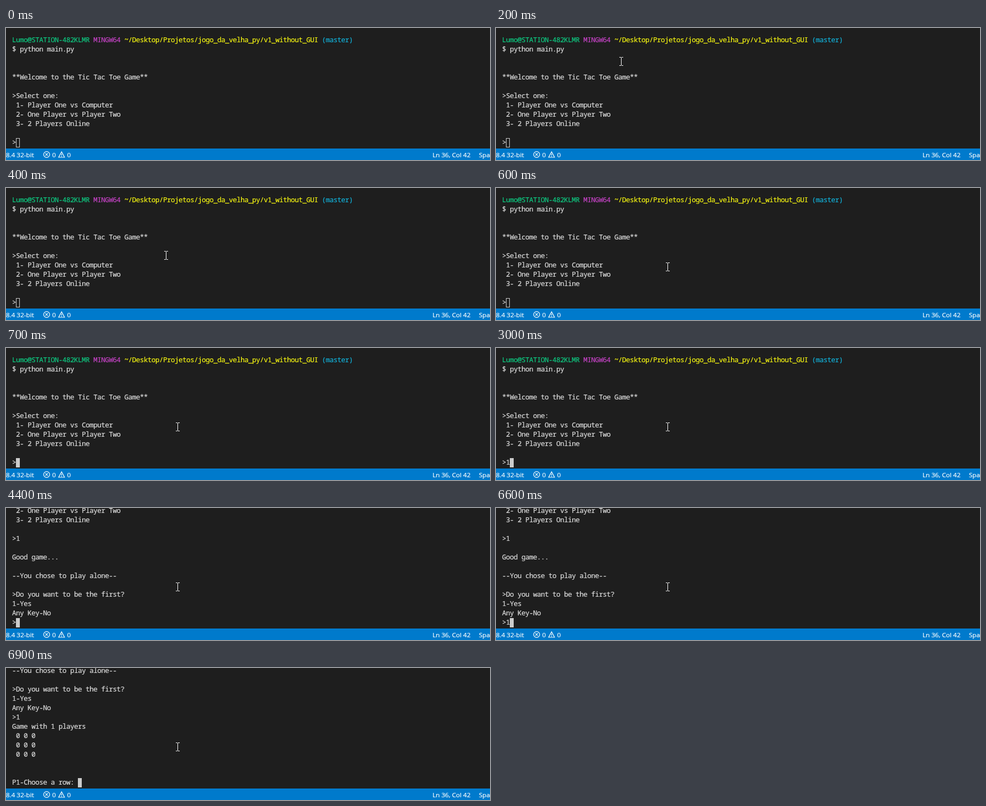
Animation, 875 px wide and 241 px high, one loop 8 s. Source, as an HTML page:

```html
<!DOCTYPE html>
<html lang="en">
<head>
<meta charset="utf-8">
<title>Terminal game</title>
<style>
  html, body { margin: 0; width: 100%; height: 100%; overflow: hidden; background: #1e1e1e; }
  #stage { position: relative; width: 875px; height: 241px; overflow: hidden; }
  #stage > * { position: absolute; }
  #screen {
    left: 11px; bottom: 24px; margin: 0; color: #dedede;
    font: 12.5px/17px "Noto Sans Mono", monospace; font-variant-ligatures: none;
    letter-spacing: calc(7px - 1ch); -webkit-text-stroke: 0.2px;
  }
  #caret { top: 201px; width: 7px; height: 17px; box-sizing: border-box; border: 1px solid #ccc; }
  #caret.focus { background: #ccc; }
  svg { left: 0; top: 0; }
  #bar text { font: 11.6px "Open Sans", sans-serif; fill: #fff; stroke: #fff; stroke-width: 0.2px; }
  .host { color: #0ecb82; }
  .system { color: #c844c8; }
  .path { color: #f6f611; }
  .branch { color: #12b2da; }
</style>
</head>
<body>
<div id="stage">
  <pre id="screen"></pre>
  <div id="caret"></div>
  <svg id="bar" width="875" height="241">
    <path d="M0 220h875v21H0z" fill="#007acc"/>
    <g fill="none" stroke="#fff" stroke-width="1.2">
      <circle cx="73.5" cy="231" r="5.4"/>
      <path d="M71.2 228.7l4.6 4.6m0-4.6l-4.6 4.6M100.5 226l5.3 10h-10.6zM100.5 229.5v3.3m0 1v1.2"/>
    </g>
    <text x="0" y="236">8.4 32-bit</text>
    <text x="83.5" y="236">0</text>
    <text x="110.5" y="236">0</text>
    <text x="771" y="236">Ln 36, Col 42</text>
    <text x="855" y="236">Spaces</text>
  </svg>
  <svg width="875" height="241">
    <path id="mouse" d="M-3.5-7.5h3m1 0h3M0-7V7M-3.5 7.5h3m1 0h3" fill="none" stroke="#fff" shape-rendering="crispEdges"/>
  </svg>
</div>
<script>
const LOOP = 8000, STEP = 100;
const [screenEl, caret, mouse] = ['screen', 'caret', 'mouse'].map(id => document.getElementById(id));
const span = (name, text) => `<span class="${name}">${text}</span>`;

const prompt = [
  span('host', 'Lumo@STATION-482KLMR'),
  span('system', 'MINGW64'),
  span('path', '~/Desktop/Projetos/jogo_da_velha_py/v1_without_GUI'),
  span('branch', '(master)')
].join(' ');

// Output is appended at each time; the screen stays anchored to its last line.
const output = [
  [0, `${prompt}
$ python main.py


**Welcome to the Tic Tac Toe Game**

>Select one:
 1- Player One vs Computer
 2- One Player vs Player Two
 3- 2 Players Online

>`],
  [3000, '1'],
  [4400, `

Good game...

--You chose to play alone--

>Do you want to be the first?
1-Yes
Any Key-No
>`],
  [6600, '1'],
  [6900, `
Game with 1 players
 0 0 0
 0 0 0
 0 0 0


P1-Choose a row: `]
];

let shown = 0;

function draw(t) {
  const parts = output.filter(([start]) => start <= t);
  if (parts.length !== shown) {
    shown = parts.length;
    screenEl.innerHTML = parts.map(([, text]) => text).join('');
    const lastLine = screenEl.textContent.split('\n').pop();
    caret.style.left = 11 + 7 * lastLine.length + 'px';
  }
  caret.classList.toggle('focus', t >= 700);

  // The pointer slows down along a diagonal, in steps.
  const left = Math.max(0, 600 - Math.floor(t / STEP) * STEP) / 500;
  const x = Math.round(310 - 131 * left ** 2) + 0.5;
  const y = Math.round(144 - 129 * left ** 2);
  mouse.setAttribute('transform', `translate(${x} ${y})`);
  mouse.style.visibility = t < STEP ? 'hidden' : 'visible';
}

const begin = performance.now();
function tick() {
  draw((performance.now() - begin) % LOOP);
  requestAnimationFrame(tick);
}
tick();
</script>
</body>
</html>
```
